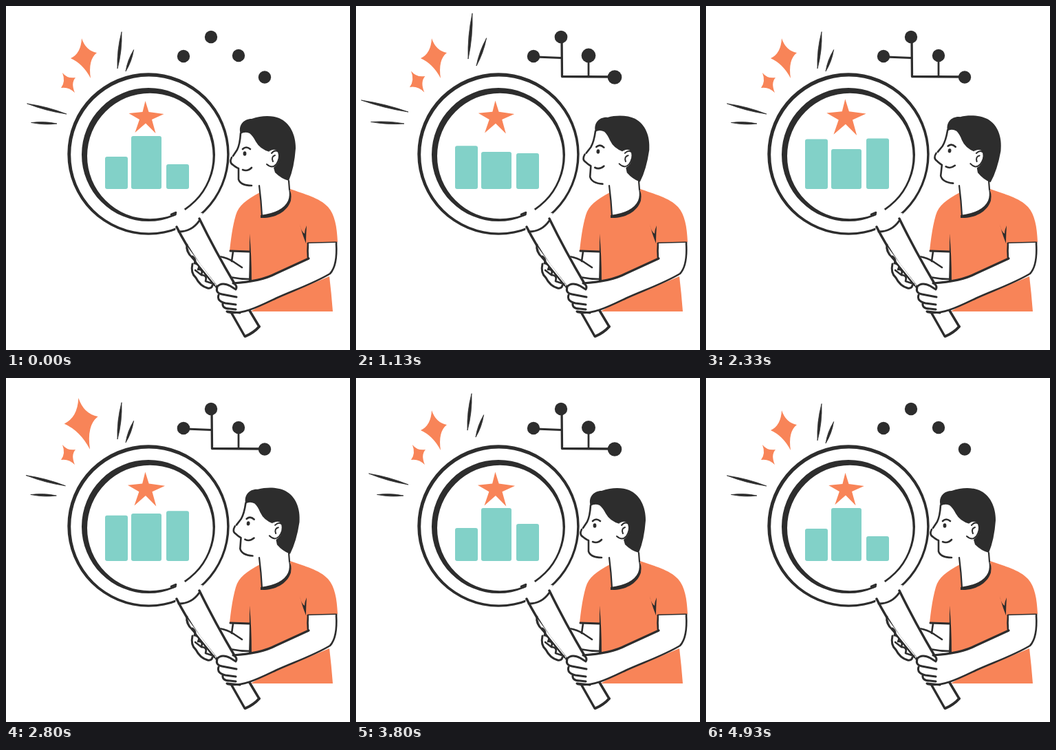
Write an HTML page that moves like this. It is 500 px wide and 500 px high and loops after 5010 ms.

```html
<!DOCTYPE html>
<html lang="en">
<head>
<meta charset="utf-8">
<title>Searching for insights</title>
<style>
html, body { margin: 0; width: 100%; height: 100%; overflow: hidden; background: #fff; }
svg { display: block; width: 100%; height: 100%; }
.ink { fill: none; stroke: #2d2d2d; }
.dark { fill: #2d2d2d; }
.orange { fill: #f88458; }
.teal { fill: #82d1c8; }
.white { fill: #fff; }
</style>
</head>
<body>
<svg viewBox="0 0 500 500" stroke-width="2.600" stroke-linecap="round" stroke-linejoin="round">
  <g id="rays" class="dark" stroke="#2d2d2d" stroke-width="0.800"></g>
  <path id="big" class="orange" d="M110 47Q116 65 132 68Q119 78 123 105Q112 84 94 76Q109 69 110 47Z"/>
  <path id="small" class="orange" d="M82 97Q89 106 101 104Q94 112 100 126Q91 117 80 119Q87 110 82 97Z"/>

  <g id="links" class="ink" stroke-linecap="butt"></g>
  <g id="dots" class="dark"></g>

  <!-- lens -->
  <path class="dark" fill-rule="evenodd" d="M89.300 215a117.700 117.700 0 1 1 235.400 0a117.700 117.700 0 1 1 -235.400 0ZM94.200 216a113.500 113.500 0 1 1 227 0a113.500 113.500 0 1 1 -227 0Z"/>
  <path class="dark" fill-rule="evenodd" d="M110 216a97 97 0 1 1 194 0a97 97 0 1 1 -194 0ZM118 218a91.300 91.300 0 1 1 182.600 0a91.300 91.300 0 1 1 -182.600 0Z"/>
  <path class="white" d="M248 296L257 292L262 299L286 301L281 312L246 332Z"/>
  <path class="ink" d="M240 303L247 300L246 303"/>
  <g id="bars" class="teal"></g>
  <path id="star" class="orange" d="M202.500 138L207.500 154L229.500 157L212 165L217.500 185L203 170.500L187.500 184L194 165L178.500 156L198.500 154Z"/>

  <!-- shirt and neck -->
  <path class="orange" d="M369 271C350 281 338 290 334 304C329 321 327 339 325 356L354 357L355 400L376 397L440 367L439 345L482 343C481 321 478 303 468 292C456 279 433 273 413 266L413 279C409 296 393 304 372 306Z"/>
  <path class="orange" d="M356 444Q373 432 393 425L470 393Q473 418 475 444Z"/>
  <path class="white" d="M367 255L413 250L413 279Q404 301 372 306Z"/>
  <path class="ink" d="M368 261Q371 284 372 305M411 254L412 267" stroke-width="2.200"/>
  <path class="dark" d="M370 304Q402 300 410 283Q413 276 411 266Q416 271 414 283C408 301 388 309 370 308Z"/>
  <path class="dark" d="M354 331Q357 362 357 400L353 399Q354 372 354 331Z"/>
  <path class="dark" d="M427 317Q429 328 434 331Q434 325 437 319Q436 334 436 345Q430 330 427 317Z"/>
  <path class="ink" d="M326 356L354 357M439 345L480 344" stroke-width="3"/>
  <path class="ink" d="M439 345Q438 356 439 366"/>

  <!-- far arm -->
  <path class="ink" d="M330 357L328 371M310 364Q322 366 331 372L343 380M325 394Q340 397 355 397"/>

  <!-- handle -->
  <path class="white" d="M248 322L281 309L369 467L348 481Z"/>
  <path class="ink" d="M248 321Q261 347 281 376L306 408L347 480M281 309Q304 356 333 405M350 436L368 466" stroke-width="3.500"/>
  <path class="ink" d="M251 328Q270 328 281 312" stroke-width="3"/>
  <path class="ink" d="M348 480Q360 475 368 466" stroke-width="4"/>

  <!-- far hand -->
  <path class="white" d="M263 349L270 364L270 384Q276 400 287 408L299 409L306 406L287 381Z"/>
  <path class="ink" d="M263 347Q261 357 271 366M271 364Q277 369 274 374M271 375Q268 388 276 395Q282 407 293 410Q299 411 300 406" stroke-width="3"/>
  <path class="ink" d="M275 374Q283 377 279 383Q287 382 284 391Q293 391 290 400L302 404M270 365L281 379L303 406M275 384L284 391"/>

  <!-- near arm and hand -->
  <path class="white" d="M440 345L480 344L480 368Q478 384 468 391L392 425L354 442Q338 449 322 445Q315 439 316 433Q307 428 309 421Q303 416 307 409Q312 402 324 404L333 404Q350 402 376 397L440 367Z"/>
  <path class="ink" d="M480 345Q482 377 471 389C448 403 416 414 392 425C369 436 342 450 322 445"/>
  <path class="ink" d="M330 403C359 401 377 397 392 389L440 367" stroke-width="3.200"/>
  <path class="ink" d="M306 409Q313 400 326 407L334 412Q337 407 331 403M307 409Q304 417 314 419L335 423M309 420Q306 429 319 432L334 434M315 432Q314 440 325 440L334 441M321 444L340 446" stroke-width="3"/>

  <!-- head -->
  <g id="head">
    <path class="white" d="M341 180Q339 203 328 222L327 229L337 235L338 254Q346 263 368 260L411 250L400 190L368 178Z"/>
    <path class="dark" d="M341 186C337 174 345 164 357 164C371 159 387 159 397 163C413 170 421 187 421 207Q419 235 411 254Q400 251 391 242L389 235Q397 230 397 218Q396 208 388 211Q385 214 383 212Q369 208 363 197Q359 189 354 185Q347 182 341 186Z"/>
    <path class="white" d="M378 216Q385 207 392 209Q399 214 396 224Q392 235 384 234Q378 230 378 216Z"/>
    <path class="ink" d="M386 214Q391 208 396 212Q399 221 393 230Q387 237 379 230M391 217Q385 219 388 226" stroke-width="2"/>
    <path class="ink" d="M341 185Q340 201 336 209L330 218M328 220Q324 228 330 231Q335 235 338 236L338 252Q341 261 357 261"/>
    <path class="ink" d="M344 208Q349 203 355 208M344 238Q351 241 357 235"/>
    <ellipse class="dark" cx="347" cy="214.500" rx="2.400" ry="3.200"/>
  </g>
</svg>
<script>
const LOOP = 5010, HALF = LOOP / 2;
const $ = id => document.getElementById(id);

function add(parent, tag, attrs) {
  const el = document.createElementNS('http://www.w3.org/2000/svg', tag);
  for (const k in attrs) el.setAttribute(k, attrs[k]);
  return $(parent).appendChild(el);
}
const ease = (t, a, b) => {
  const p = Math.min(1, Math.max(0, (t - a) / (b - a)));
  return (1 - Math.cos(Math.PI * p)) / 2;
};
// rises over a..b, stays, falls over c..d
const swell = (t, a, b, c, d) => ease(t, a, b) - ease(t, c, d);
const pulse = (t, a, len) => swell(t, a, a + len / 2, a + len / 2, a + len);

// outer end, inner end, width, then travel of both ends in the first and second burst
const rays = [
  [[31, 142], [88, 157], 3.4, [-23, -5], [-12, -3], [-12, -3], [-12, -2]],
  [[37, 169.5], [74, 171], 3.2, [-15, -1], [-4, 0], [-6, 0], [-5, 0]],
  [[168, 38], [162, 91], 4, [1, -27], [1, -14], [0, -15], [0, -15]],
  [[185.5, 64], [174, 95], 3.4, [4, -17], [1, -8], [0, -10], [0, -9]]
].map(r => ({ r, el: add('rays', 'path', {}) }));

function taper(p, q, w) {
  const dx = q[0] - p[0], dy = q[1] - p[1], len = Math.hypot(dx, dy);
  const nx = -dy / len * w, ny = dx / len * w;
  const mx = (p[0] + q[0]) / 2, my = (p[1] + q[1]) / 2;
  return `M${p}Q${mx + nx} ${my + ny} ${q}Q${mx - nx} ${my - ny} ${p}Z`;
}

const links = [
  ['M262 74L299 75.500', 2.8, 150, 600],
  ['M299 45L299.500 102.500L376 103', 3.3, 200, 1000],
  ['M338 72L338 103', 2.8, 750, 1050]
].map(([d, width, a, b]) => ({ a, b, el: add('links', 'path', { d, pathLength: 1, 'stroke-width': width }) }));

const dots = [[258, 73, 200], [298, 45, 250], [338, 72, 600], [376, 103.5, 700]]
  .map(([cx, cy, at]) => ({ at, el: add('dots', 'circle', { cx, cy }) }));

const bars = [
  [144, 33, 219, -26, [0, 2000, 2150, 4050]],
  [182, 44, 189, 24, [0, 1300, 1875, 3395]],
  [233, 33, 230, -38, [0, HALF, HALF, LOOP]]
].map(([x, width, top, move, time]) => ({ top, move, time, el: add('bars', 'rect', { x, width, rx: 3 }) }));

function zoom(id, x, y, s, dx = 0, dy = 0) {
  $(id).setAttribute('transform', `translate(${x + dx} ${y + dy}) scale(${s}) translate(${-x} ${-y})`);
}

function draw(t) {
  const h = t % HALF;

  const b1 = swell(t, 0, 1100, 1100, 2380), b2 = pulse(t, HALF, HALF);
  for (const { r, el } of rays) {
    const shift = (p, u, v) => p.map((c, i) => c + u[i] * b1 + v[i] * b2);
    el.setAttribute('d', taper(shift(r[0], r[3], r[5]), shift(r[1], r[4], r[6]), r[2]));
  }

  const k1 = pulse(h, 0, 1000), k2 = pulse(h, 300, 1000);
  zoom('big', 113, 76, 1 + 0.45 * k1, -6 * k1, -15 * k1);
  zoom('small', 90.5, 111.5, 1 + 0.27 * k2, -5 * k2, -6 * k2);
  zoom('star', 204, 161, 1 + 0.17 * pulse(t % (LOOP / 5), 0, LOOP / 5));

  for (const { el, a, b } of links) {
    const p = swell(t, a, b, 4900 - b, 4900 - a);
    el.setAttribute('stroke-dasharray', `${p} 2`);
    el.setAttribute('visibility', p > 0.001 ? 'visible' : 'hidden');
  }
  for (const { el, at } of dots) el.setAttribute('r', 9.2 + 1.2 * pulse(h, at, 1000));

  for (const { el, top, move, time } of bars) {
    const y = top + move * swell(t, ...time);
    el.setAttribute('y', y);
    el.setAttribute('height', 266 - y);
  }

  $('head').setAttribute('transform', `rotate(${6 * swell(t, 0, 1800, 2300, 3750)} 390 280)`);
}

// the picture steps twice in every 100 ms
function tick(now) {
  const t = now % LOOP, base = Math.floor(t / 100) * 100;
  draw(t >= 4930 ? 4930 : t - base < 30 ? base : base + 30);
  requestAnimationFrame(tick);
}
tick(performance.now());
</script>
</body>
</html>
```
